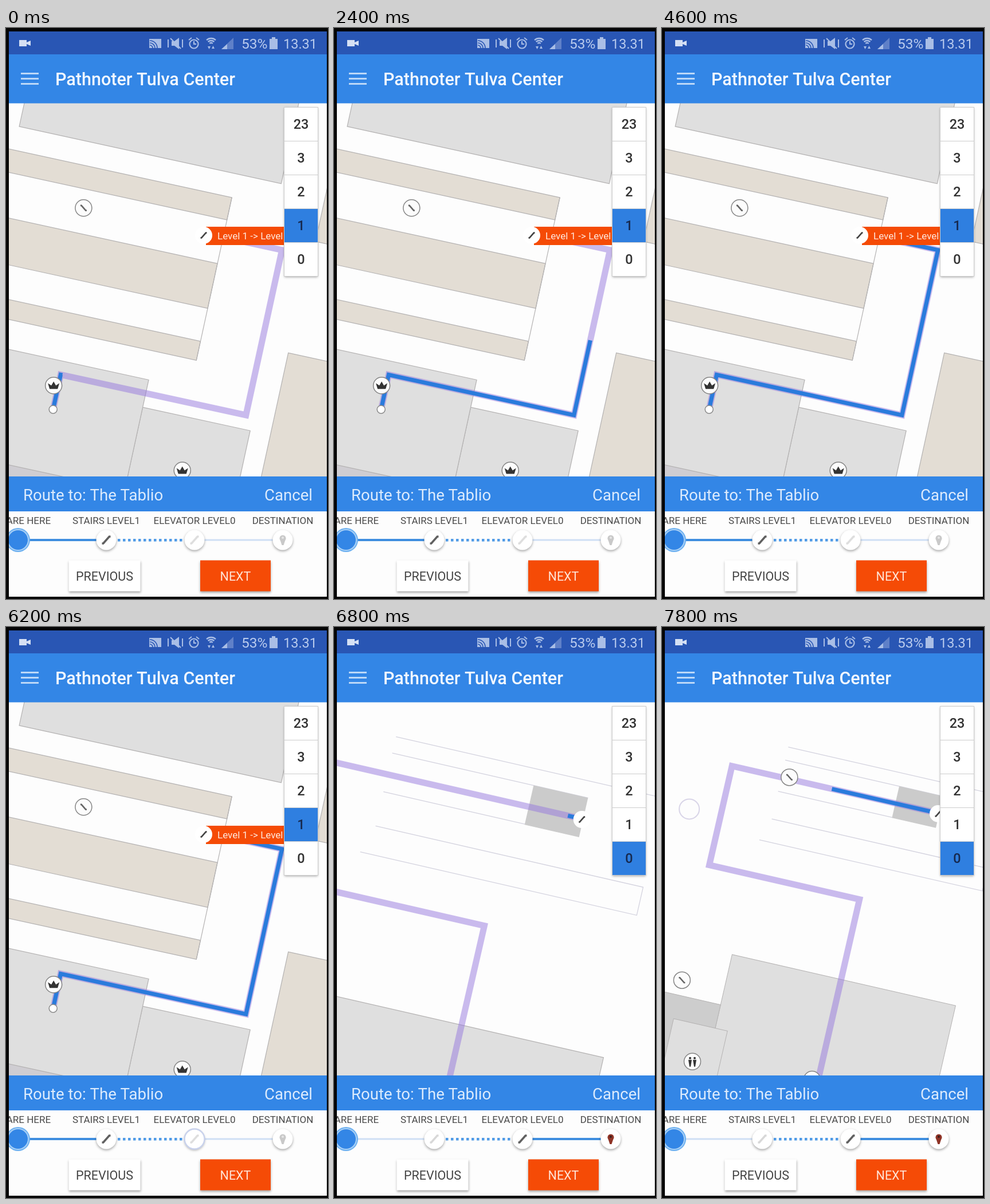
These frames come from a looping animation (562x997 px, 8 s). An HTML page with a canvas:

```html
<!DOCTYPE html>
<html lang="en">
<head>
<meta charset="utf-8">
<title>Indoor route</title>
<style>
  html, body { margin: 0; width: 100%; height: 100%; overflow: hidden; background: #000; }
  canvas { display: block; width: 562px; height: 997px; filter: blur(.6px); }
</style>
</head>
<body>
<canvas id="stage" width="562" height="997"></canvas>
<script>
const ctx = document.getElementById('stage').getContext('2d');
const LOOP = 8000, STEP = 200, PRESS = 6200, SWITCH = 6600, FLIGHT = 500;
const BLUE = '#3386e6', ROUTE_BLUE = '#2a7bdc', ORANGE = '#f54b06';
const GREY = '#dfdfdf', BEIGE = '#e3ddd4', EDGE = '#b4b2b2';
const STATUS = '#a9bee6', STATUS_BG = '#2956b4', FAR = 700;

const lerp = (a, b, u) => a + (b - a) * u;

// ---- drawing helpers ----
function rect(x, y, w, h, fill) {
  ctx.fillStyle = fill;
  ctx.fillRect(x, y, w, h);
}

function stroke(path, color, width) {
  ctx.strokeStyle = color;
  ctx.lineWidth = width;
  ctx.stroke(new Path2D(path));
}

function fill(path, color) {
  ctx.fillStyle = color;
  ctx.fill(new Path2D(path));
}

function circle(x, y, r, color, edge, width = 1.5) {
  ctx.beginPath();
  ctx.arc(x, y, r, 0, 7);
  if (color) { ctx.fillStyle = color; ctx.fill(); }
  if (edge) { ctx.strokeStyle = edge; ctx.lineWidth = width; ctx.stroke(); }
}

function text(str, x, y, size, color, align = 'left', weight = 400) {
  ctx.font = `${weight} ${size}px Roboto, sans-serif`;
  ctx.textAlign = align;
  ctx.fillStyle = color;
  ctx.fillText(str, x, y);
}

function at(x, y, draw) {
  ctx.save();
  ctx.translate(x, y);
  draw();
  ctx.restore();
}

function withShadow(draw) {
  ctx.save();
  ctx.shadowColor = 'rgba(0,0,0,.35)';
  ctx.shadowBlur = 4;
  ctx.shadowOffsetY = 2;
  draw();
  ctx.restore();
}

// ---- icons, centred on the current origin ----
function stairs(color, size = 5.5, falling = false) {
  ctx.save();
  if (falling) ctx.scale(1, -1);
  ctx.scale(size, size);
  stroke('M-1 .8H-.7L.7-.8H1', color, .48);
  ctx.restore();
}

function badge() {
  circle(0, 0, 14.5, '#fcfcfc', '#858585');
}

function stairsBadge() {
  badge();
  stairs('#666', 5.5, true);
}

function crownBadge() {
  badge();
  fill('M-7 6L-10-4L-4 0L0-7L4 0L10-4L7 6Z', '#333');
}

function restroomBadge() {
  badge();
  for (const x of [-4, 4]) {
    circle(x, -6, 2, '#333');
    fill(`M${x - 3}-3h6l-2 12h-2z`, '#333');
  }
}

function stairsDisc() {
  circle(0, 0, 15, '#fff');
  stairs('#444');
}

// ---- map: axis-aligned plan, rotated about the stairs ----
function withPlan(x, y, degrees, zoom, draw) {
  at(x, y, () => {
    ctx.rotate(degrees * Math.PI / 180);
    ctx.scale(zoom, zoom);
    draw(1 / zoom);
  });
}

// Upright, constant-size drawing at a plan position
function marker(u, v, draw) {
  const p = ctx.getTransform().transformPoint(new DOMPoint(u, v));
  ctx.save();
  ctx.resetTransform();
  at(p.x, p.y, draw);
  ctx.restore();
}

function room(u, v, w, h, color, edge = EDGE) {
  rect(u, v, w, h, color);
  ctx.strokeStyle = edge;
  ctx.lineWidth = 1.2;
  ctx.strokeRect(u, v, w, h);
}

function route(path, progress, px) {
  stroke(path, 'rgba(150,120,222,.5)', 11 * px);
  ctx.setLineDash([Math.max(0, progress), 9999]);
  if (progress > 0) stroke(path, ROUTE_BLUE, 7.2 * px);
  ctx.setLineDash([]);
}

function upperLevel(t) {
  const progress = 65 + .154 * t + 1.6e-5 * t * t;
  withPlan(345, 362, 12.3, 1, px => {
    room(-355, -117 - FAR, 468, FAR, GREY);
    for (const [v, depth] of [[-75, 40], [43, 80], [182, 34]]) room(34 - FAR, v, FAR, depth, BEIGE);
    stroke('M34-75V216', EDGE, 1.2);
    room(-40, 316, 192, FAR, GREY);
    room(-40 - FAR, 267, FAR, FAR, GREY);
    room(-40 - FAR, 464, FAR, FAR, '#cfcdd2');
    room(188, 169, FAR, FAR, BEIGE);
    room(193, -160, FAR, 129, BEIGE);
    route('M-192 353V291H139V-4H0', progress, px);
    marker(-200, 312, crownBadge);
    marker(51, 409, crownBadge);
    marker(-192, 353, () => circle(0, 0, 7, '#fff', '#8b8b8b'));
    marker(-215, -2, stairsBadge);
  });
  rect(349, 347, 150, 32, ORANGE);
  text('Level 1 -> Level 0', 369, 369, 17, '#ffe9df');
  at(345, 362, stairsDisc);
}

function lowerLevel(t) {
  const u = Math.min(1, (t - SWITCH) / FLIGHT);
  const pan = 1 - (1 - u) ** 2, zoom = lerp(1.11, .81, u * u * (3 - 2 * u));
  withPlan(lerp(345, 482, pan), lerp(354, 326, pan), 12.9, zoom, px => {
    stroke('M-347-68H400M-347-39H2M-347 30H-94M-347 91H130V141H-363', '#d3d2de', 1.3 * px);
    rect(-95, -39, 97, 70, '#cbcbcb');
    room(-365, 395, 494, FAR, GREY);
    room(-365 - FAR, 506, FAR, FAR, '#cdcdcd');
    room(-457, 558, 119, FAR, GREY);
    route('M0-1H-456V218H-124V620', .21 * (t - SWITCH - 80), px);
    if (u === 1) {
      marker(-330, -5, stairsBadge);
      marker(-458, 473, stairsBadge);
      marker(-397, 639, restroomBadge);
      marker(-137, 619, badge);
      marker(-525, 110, () => circle(0, 0, 17.5, null, '#d9d5e8', 2));
    }
    marker(0, 0, stairsDisc);
  });
}

// ---- app chrome ----
function floorPicker(active) {
  withShadow(() => rect(486, 138, 58, 295, '#fff'));
  ['23', '3', '2', '1', '0'].forEach((label, i) => {
    const y = 138 + i * 59, on = label === active;
    if (on) rect(486, y, 58, 59, '#2f7fe0');
    ctx.strokeStyle = '#ccc';
    ctx.lineWidth = 1;
    ctx.strokeRect(485.5, y + .5, 59, 59);
    text(label, 515, y + 38, 23.5, on ? '#16294f' : '#333', 'center', 500);
  });
}

function fan(x, y, from, to, radii) {
  for (const r of radii) {
    ctx.beginPath();
    ctx.arc(x, y, r, from, to);
    ctx.stroke();
  }
}

function statusBar() {
  rect(5, 6, 556, 40, STATUS_BG);
  fill('M23 21h13v4l7-3v9l-7-3v4h-13z', '#d5e0f4');

  rect(250, 19, 21, 16, STATUS);
  ctx.strokeStyle = STATUS_BG;
  ctx.lineWidth = 1.6;
  fan(251, 35, -Math.PI / 2, 0, [5, 9, 13]);

  fill('M289 23h5l8-6v20l-8-6h-5z', STATUS);
  stroke('M283 20v14M308 20v14M287 18l18 18', STATUS, 2);

  circle(328, 28, 7.5, null, STATUS, 2.2);
  stroke('M328 23v5h4M319 21l5-4M332 17l5 4', STATUS, 2);

  ctx.lineWidth = 2.4;
  fan(358, 30, -2.3, -.84, [4, 8, 12]);
  fill('M352 32h5l-2.5 5zM359 36h5l-2.5-5z', STATUS);

  fill('M376 37h21v-20z', '#5f80c8');
  fill('M376 37h10v-9z', STATUS);
  text('53%', 411, 36, 24.5, '#b9cbee');
  fill('M460 19h4v-3h6v3h4v18h-14z', STATUS);
  text('13.31', 543, 36, 23.5, '#b9cbee', 'right');
}

function header() {
  rect(5, 46, 556, 85.5, BLUE);
  for (let i = 0; i < 3; i++) rect(26, 78 + 9 * i, 31, 3, '#bcd8f8');
  text('Pathnoter Tulva Center', 86, 100, 30.5, '#f3f8ff', 'left', 500);
}

function stepper(lower, pressed) {
  const stopX = i => 21 + 154 * i;
  const leg = (i, active) => rect(stopX(i), active ? -2 : -1.5, 154, active ? 4 : 3, active ? '#3f8edf' : '#cfdff5');
  at(0, 894, () => {
    ['YOU ARE HERE', 'STAIRS LEVEL1', 'ELEVATOR LEVEL0', 'DESTINATION'].forEach((label, i) =>
      text(label, stopX(i), -28, 17, '#4a4a4a', 'center'));
    leg(0, !lower);
    leg(2, lower);
    for (let x = 195; x < 308; x += 9) rect(x, -2, 4.5, 4.5, '#4f9ae6');

    circle(stopX(0), 0, 21, '#6cb0f0');
    circle(stopX(0), 0, 19, '#a9d0f6');
    circle(stopX(0), 0, 17, BLUE);
    for (let i = 1; i < 4; i++) withShadow(() => circle(stopX(i), 0, 17.5, '#fff'));
    if (pressed) circle(stopX(2), 0, 17.5, null, '#c9d2ec', 2.5);
    at(stopX(1), 0, () => stairs(lower ? '#d8d8d8' : '#606060', 7.5));
    at(stopX(2), 0, () => stairs(lower ? '#606060' : '#dedede', 7.5));
    at(stopX(3), -3, () => {
      const pin = lower ? '#8f3427' : '#c9c9c9';
      fill('M-5.5 0h11L1.5 12h-3z', pin);
      circle(0, 0, 5.5, pin);
      circle(0, -1, 2, lower ? '#3c1d1a' : '#e6e6e6');
    });
  });
}

function button(label, x, w, color, ink) {
  withShadow(() => rect(x, 929.5, w, 54, color));
  text(label, x + w / 2, 965, 21.5, ink, 'center');
}

function footer(lower, pressed) {
  rect(5, 783, 556, 61, BLUE);
  text('Route to: The Tablio', 30, 825, 27.6, '#dcebfd');
  text('Cancel', 535, 825, 27.6, '#dcebfd', 'right');
  rect(5, 844, 556, 149, '#fdfdfd');
  stepper(lower, pressed);
  button('PREVIOUS', 109.5, 125, '#fff', '#444');
  button('NEXT', 339, 123, ORANGE, '#ffe3d6');
}

function draw(now) {
  const t = Math.floor(now % LOOP / STEP) * STEP;
  const lower = t >= SWITCH;
  rect(0, 0, 562, 997, '#050505');
  ctx.save();
  ctx.beginPath();
  ctx.rect(5, 6, 555, 987);
  ctx.clip();
  rect(5, 131, 556, 653, '#fdfdfd');
  (lower ? lowerLevel : upperLevel)(t);
  floorPicker(lower ? '0' : '1');
  statusBar();
  header();
  footer(lower, t >= PRESS && !lower);
  ctx.restore();
}

function tick() {
  draw(performance.now());
  requestAnimationFrame(tick);
}
tick();
</script>
</body>
</html>
```
